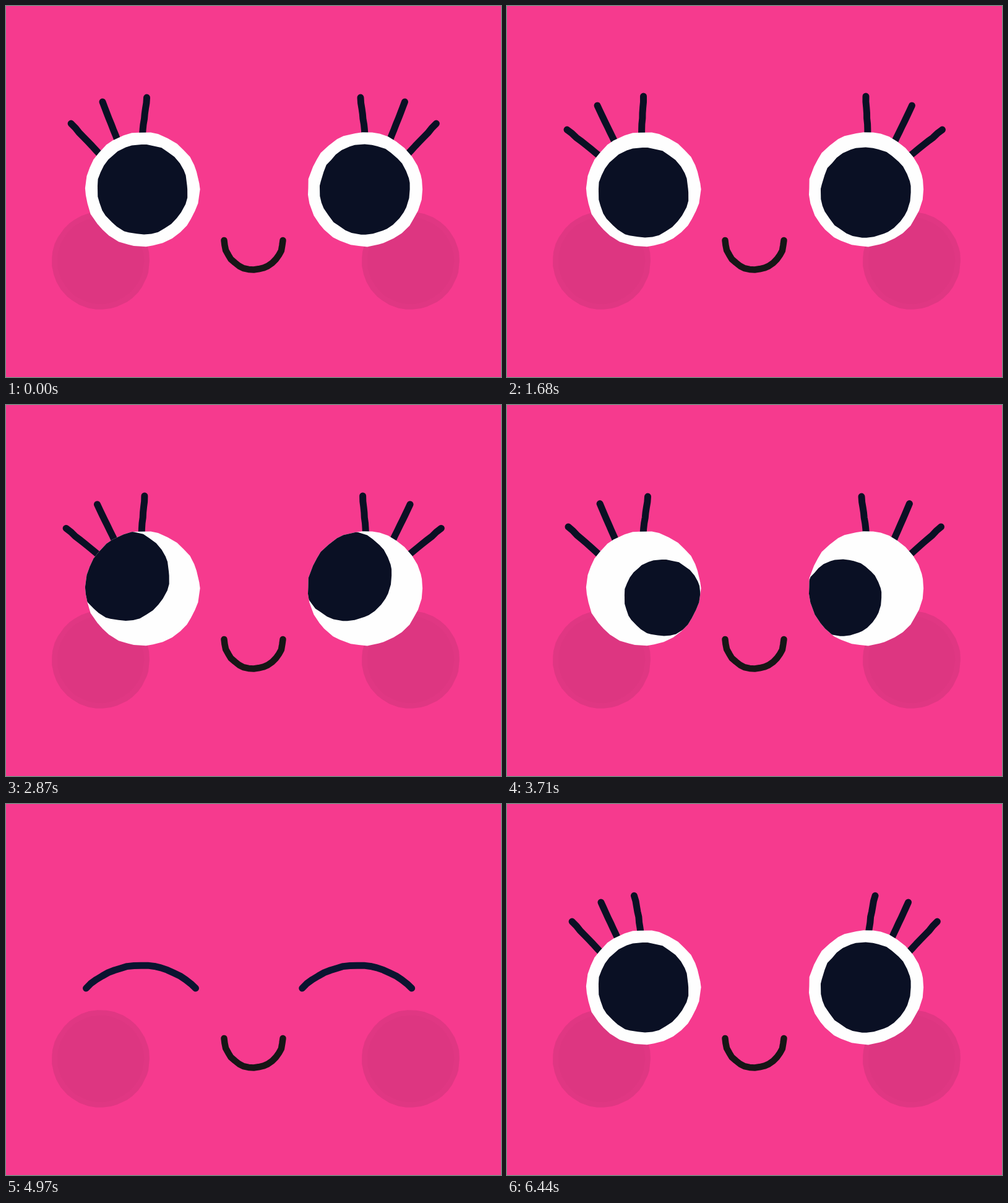
An HTML page with a canvas that plays this animation: 800 px wide and 600 px high, repeating every 6.51 s.

```html
<!DOCTYPE html>
<html lang="en">
<head>
<meta charset="utf-8">
<title>Blushing face</title>
<style>
html, body { margin: 0; width: 100%; height: 100%; overflow: hidden; background: #f63a8e; }
canvas { display: block; }
</style>
</head>
<body>
<canvas id="stage" width="800" height="600"></canvas>
<script>
const ctx = document.getElementById('stage').getContext('2d');
const LOOP = 6510, STEP = 70;
const CLOSE = 4130, OPEN = 5950;
const PINK = '#f63a8e', NAVY = '#0a1024', WHITE = '#fefefe';
const EYE = { x: 220.5, y: 296.5, r: 92.3 };

// Each lash: tip angle from vertical, tip distance, base angle (outer, middle, inner).
const POSE = {
  up:      [47.3, 157, 50.7,   24.5, 155.5, 27,   -2.7, 148.6, 0],
  flick:   [47.3, 157, 50.7,   26.5, 153.6, 27.8,  5.8, 149, 2.8],
  wide:    [52, 156.7, 52.8,   28.8, 154.6, 31.3,  0, 150.5, 1.9],
  side:    [51.8, 157, 52.8,   28.3, 154.2, 30.2, -1.3, 149.5, 0.9],
  inward:  [50.7, 157, 52.8,   27.2, 154, 30.2,   -2.7, 148.6, 0.3],
  lowered: [71.7, 155, 63.9,   55.1, 153, 47.6,   38, 84, 30],
  down:    [77, 155, 68,       61, 152, 52,       46, 78, 38]
};
const LASHES = [
  [0, POSE.up], [140, POSE.up], [420, POSE.down], [530, POSE.down],
  [700, POSE.lowered], [910, POSE.flick], [1050, POSE.up], [1470, POSE.up],
  [1680, POSE.wide], [2870, POSE.side], [3710, POSE.inward], [CLOSE, POSE.inward],
  [OPEN, POSE.down], [6160, POSE.lowered], [6440, POSE.flick], [LOOP, POSE.up]
];

// Pupil: left offset x, right offset x, offset y, radius.
const CENTRE = [0, 0, 0, 73], DIP = [0, 0, 5, 73];
const ASIDE = [-29.5, -29.5, -20.5, 73], CROSSED = [31, -36.5, 15, 62];
const PUPILS = [
  [0, CENTRE], [1470, CENTRE], [1680, DIP], [1820, DIP], [2240, ASIDE],
  [3290, ASIDE], [3640, CROSSED], [CLOSE, CROSSED], [OPEN, CENTRE], [LOOP, CENTRE]
];

const rad = degrees => degrees * Math.PI / 180;

function sample(track, t) {
  const i = track.findIndex(key => key[0] > t);
  const [t0, a] = track[i - 1], [t1, b] = track[i];
  const u = (t - t0) / (t1 - t0), e = u * u * (3 - 2 * u);
  return a.map((v, k) => v + (b[k] - v) * e);
}

function random(seed) {
  return () => {
    seed = (seed * 16807) % 2147483647;
    return seed / 2147483647;
  };
}

function blobPath(x, y, r, seed, rough = 1.6) {
  const next = random(seed), count = 38;
  ctx.beginPath();
  for (let i = 0; i < count; i++) {
    const a = (i + next() * 0.5) / count * Math.PI * 2;
    const d = r + (next() - 0.4) * rough;
    ctx.lineTo(x + d * Math.cos(a), y + d * Math.sin(a));
  }
  ctx.closePath();
}

function blob(x, y, r, color, seed, rough) {
  blobPath(x, y, r, seed, rough);
  ctx.fillStyle = color;
  ctx.fill();
}

function brush(pointAt, count, width, color, seed) {
  const next = random(seed);
  ctx.beginPath();
  for (let i = 0; i <= count; i++) {
    const [x, y] = pointAt(i / count);
    const wobble = i % count ? 1 : 0;
    ctx.lineTo(x + (next() - 0.5) * wobble, y + (next() - 0.5) * wobble);
  }
  ctx.lineWidth = width;
  ctx.strokeStyle = color;
  ctx.stroke();
}

function arc(x, y, r, from, to, width, color, seed) {
  brush(u => {
    const a = from + (to - from) * u;
    return [x + r * Math.cos(a), y + r * Math.sin(a)];
  }, 18, width, color, seed);
}

function polar(angle, d) {
  return [EYE.x - d * Math.sin(rad(angle)), EYE.y - d * Math.cos(rad(angle))];
}

function drawLash(tipAngle, length, baseAngle, seed) {
  const bend = tipAngle > baseAngle ? 0.25 : 0.6;
  const base = polar(baseAngle, Math.min(88, length));
  const mid = polar(baseAngle + (tipAngle - baseAngle) * bend, (88 + length) / 2);
  const tip = polar(tipAngle, length);
  brush(u => base.map((p, k) =>
    p * (1 - u) ** 2 + 2 * mid[k] * u * (1 - u) + tip[k] * u * u), 7, 11, NAVY, seed);
}

function drawLashes(t) {
  const p = sample(LASHES, t);
  for (const mirrored of [false, true]) {
    ctx.save();
    if (mirrored) {
      ctx.translate(800.5, 0);
      ctx.scale(-1, 1);
    }
    for (let i = 0; i < 9; i += 3) drawLash(p[i], p[i + 1], p[i + 2], 71 + i);
    ctx.restore();
  }
}

function drawEye(x, dx, dy, r, seed) {
  blob(x, EYE.y, EYE.r, WHITE, seed);
  ctx.save();
  blobPath(x, EYE.y, EYE.r, seed);
  ctx.clip();
  blob(x + dx, EYE.y + dy, r, NAVY, seed + 40);
  ctx.restore();
}

function drawCheek(x) {
  blob(x, 412, 79, '#e03783', 17, 0.6);
  blob(x, 412, 70, '#dd3681', 29, 0.6);
}

function draw(t) {
  ctx.fillStyle = PINK;
  ctx.fillRect(0, 0, 800, 600);
  ctx.lineCap = ctx.lineJoin = 'round';
  drawCheek(153);
  drawCheek(654);
  if (t >= CLOSE && t < OPEN) {
    const half = Math.asin(88.5 / 124.3), top = -Math.PI / 2;
    for (const x of [218, 567.2])
      arc(x, 385.3, 124.3, top - half, top + half, 11, '#0a1430', 57);
  } else {
    drawLashes(t);
    const [left, right, dy, r] = sample(PUPILS, t);
    drawEye(EYE.x, left, dy, r, 311);
    drawEye(580.2, right, dy, r, 523);
  }
  arc(400, 379, 47.5, Math.PI, 0, 10.5, '#161616', 83);
}

function tick() {
  const t = performance.now() % LOOP;
  draw(Math.floor(t / STEP) * STEP);
  requestAnimationFrame(tick);
}
tick();
</script>
</body>
</html>
```
